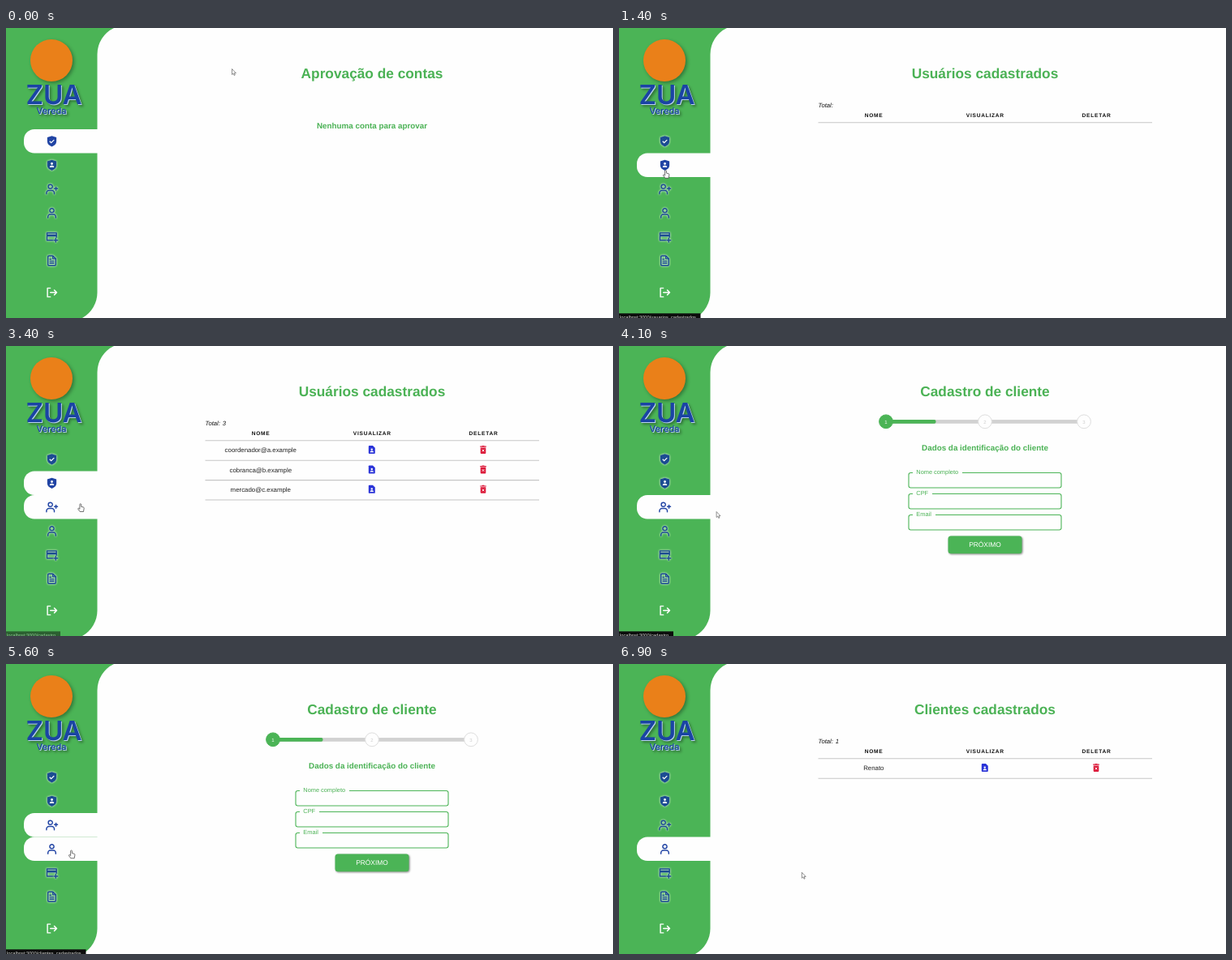
An HTML page that plays this animation: 748 by 358 pixels, repeating every 8 s.

```html
<!DOCTYPE html>
<html lang="pt-BR">
<head>
<meta charset="utf-8">
<title>Painel</title>
<style>
  html, body { margin: 0; width: 100%; height: 100%; overflow: hidden; background: #fefefe; }
  svg { display: block; width: 748px; height: 358px; }
  text { font-family: "Liberation Sans", Arial, sans-serif; text-rendering: geometricPrecision; }
  .brand { font-family: Inter, sans-serif; fill: #1a44a4; text-anchor: middle; filter: drop-shadow(1px 1px 0 #b9d3ee) drop-shadow(2px 2px 1.5px #0005); }
  .title { font-size: 17.3px; }
  .sub { font-size: 9.85px; }
  .title, .sub { font-weight: bold; fill: #4bb255; text-anchor: middle; }
  .head { font-size: 6.6px; font-weight: bold; letter-spacing: .75px; text-anchor: middle; fill: #111; }
  .cell { font-size: 7.87px; text-anchor: middle; fill: #222; }
  .total { font-size: 7.66px; font-style: italic; fill: #111; }
  .label { font-size: 7.4px; fill: #4bb255; }
  .step { font-size: 6px; text-anchor: middle; }
  .line { fill: none; stroke: currentColor; stroke-width: 2.4; stroke-linecap: round; stroke-linejoin: round; }
  .glow { filter: drop-shadow(0 0 2px #ffffffa0) drop-shadow(0 0 2px #ffffff60); }
</style>
</head>
<body>
<svg id="stage" viewBox="0 0 748 358">
  <rect width="748" height="358" fill="#fefefe"/>
  <path d="M0 0H133A36 36 0 0 0 112.5 32.5V326.5A36 36 0 0 1 94 358H0Z" fill="#4bb456"/>
  <circle cx="56" cy="40" r="26" fill="#ea8019" style="filter:drop-shadow(2px 2px 2px #0005)"/>
  <text class="brand" x="59" y="94" font-size="33" font-weight="600">ZUA</text>
  <text class="brand" x="56" y="106" font-size="11" font-weight="500">Vereda</text>
  <g id="menu"></g>
  <g id="pages"></g>
  <g id="status">
    <rect id="bar" y="352.3" height="6" fill="#0c0d0c"/>
    <text id="url" x="1" y="359.2" font-size="5.7" fill="#d4d4d4"></text>
  </g>
  <g id="pointer">
    <path id="arrow" d="M0 0V7L1.6 5.6 2.7 8 3.8 7.5 2.8 5.2H4.9Z" fill="#fff" stroke="#555" stroke-width=".65"/>
    <path id="hand" d="M-.9 .6Q0-.5 .9 .6V3.6L3.6 4.3Q4.5 4.6 4.4 5.6L3.7 9.8H-.7L-3 6.6Q-3.2 5.4-2.1 5.6L-.9 6.6Z" fill="#fff" stroke="#444" stroke-width=".75" stroke-linejoin="round"/>
  </g>
</svg>
<script>
const $ = id => document.getElementById(id);
const GREEN = '#4bb456';
const LOOP = 8000, STEP = 100;
const ROW_TOP = 125, ROW_H = 29.5;

// Menu icons on a 24-unit grid
const shield = '<path fill="currentColor" d="M12 1 2.6 4.2v8.2c0 5.2 4 8.6 9.4 10.8 5.4-2.2 9.4-5.6 9.4-10.8V4.2z"/>';
const person = '<circle cx="12" cy="9" r="2.4" fill="#fff"/><path fill="#fff" d="M7.4 16.4c0-2.4 3-3.4 4.6-3.4s4.6 1 4.6 3.4z"/>';
const line = d => `<path class="line" d="${d}"/>`;
const icons = [
  shield + '<path fill="none" stroke="#fff" stroke-width="2" d="m7.4 12 3.2 3.2 6-6"/>',
  shield + person,
  line('M17 22v-2a5 5 0 0 0-5-5H6a5 5 0 0 0-5 5v2M4.7 7a4.3 4.3 0 0 0 8.6 0 4.3 4.3 0 0 0-8.6 0M20.5 8v6.4M17.3 11.2h6.4'),
  line('M20 22v-2a5 5 0 0 0-5-5H9a5 5 0 0 0-5 5v2M7.7 7a4.3 4.3 0 0 0 8.6 0 4.3 4.3 0 0 0-8.6 0'),
  line('M21.5 13V4H2v15h11.5M20 15v8M16 19h8') + '<path fill="currentColor" d="M2 7h19.5v4.5H2z"/>',
  line('M14 2H6a2 2 0 0 0-2 2v16a2 2 0 0 0 2 2h12a2 2 0 0 0 2-2V8zM14 2v6h6M8 13h8M8 17h8M8 9h2'),
  line('M9 3H3v18h6M9 12h13M17 7l5 5-5 5')
];

const iconY = i => i < 6 ? ROW_TOP + ROW_H * (i + .5) : 326.5;
$('menu').innerHTML = icons.map((icon, i) => {
  const y = ROW_TOP + ROW_H * i;
  const tab = i < 6 ? `<path class="tab" d="M113 ${y}H35a13 13 0 0 0-13 13v${ROW_H - 26}a13 13 0 0 0 13 13h78z" fill="#fefefe"/>` : '';
  return `${tab}<g class="icon${i < 6 ? ' glow' : ''}" transform="translate(49.3 ${iconY(i) - 7.2}) scale(.6)">${icon}</g>`;
}).join('');
const tabs = document.querySelectorAll('.tab');
const glyphs = document.querySelectorAll('.icon');
glyphs[6].style.color = '#fff';

// Pages
const text = (cls, x, y, s, extra = '') => `<text class="${cls}" x="${x}" y="${y}" ${extra}>${s}</text>`;
const rule = y => `<path d="M245.5 ${y}H657" stroke="#c6c6c6" stroke-width="1.1"/>`;
const viewIcon = '<path fill="#2b34d8" d="M-4-4.1Q-4-5-3-5H1.2L4-2.2V4.1Q4 5 3 5H-3Q-4 5-4 4.1Z"/><circle cy="-.4" r="1.2" fill="#fff"/><path fill="#fff" d="M-2.3 3.2Q-2 1.3 0 1.3T2.3 3.2Z"/>';
const binIcon = '<path fill="#dc1a3a" d="M-3.8-4.4H-1.7L-1.2-5H1.2L1.7-4.4H3.8V-3.2H-3.8ZM-3.3-2.6H3.3V4Q3.3 5 2.3 5H-2.3Q-3.3 5-3.3 4Z"/><path d="M-1.3-.2 1.3 2.4M1.3-.2-1.3 2.4" stroke="#fff" stroke-width=".9"/>';

function tablePage(title, names) {
  const rows = names.map((name, i) => {
    const y = 128.3 + 24.4 * i;
    return text('cell', 313.8, y + 2.9, name) +
      `<g transform="translate(450.8 ${y - .3})">${viewIcon}</g><g transform="translate(588 ${y - .3})">${binIcon}</g>` +
      rule(y + 12.9);
  }).join('');
  return text('title', 451, 62.3, title) + text('total', 245.5, 98.4, 'Total:') +
    ['NOME', 'VISUALIZAR', 'DELETAR'].map((h, i) => text('head', 314.1 + 137.2 * i, 110.2, h)).join('') +
    rule(116.8) + `<g class="rows">${text('total', 266.8, 98.4, names.length)}${rows}</g>`;
}

function field(label, y, gapEnd) {
  return `<rect x="357" y="${y}" width="188" height="18.5" rx="2.5" fill="none" stroke="${GREEN}" stroke-width="1.1"/>` +
    `<rect x="362" y="${y - 1}" width="${gapEnd - 362}" height="2" fill="#fefefe"/>` +
    text('label', 366.3, y + 1.8, label);
}

function stepDot(n) {
  const x = 207 + 122 * n, on = n === 1;
  return `<circle cx="${x}" cy="93.3" r="8.4" fill="${on ? GREEN : '#fefefe'}" stroke="${on ? GREEN : '#dedede'}"/>` +
    text('step', x, 95.5, n, `fill="${on ? '#fff' : '#cfcfcf'}"`);
}

const formPage = text('title', 451, 62.3, 'Cadastro de cliente') +
  `<rect x="329" y="91.1" width="244" height="4.6" fill="#d1d1d1"/><rect x="329" y="91.1" width="61.5" height="4.6" rx="2" fill="${GREEN}"/>` +
  [1, 2, 3].map(stepDot).join('') +
  text('sub', 451, 129.4, 'Dados da identificação do cliente') +
  field('Nome completo', 156.5, 423) + field('CPF', 182.5, 386) + field('Email', 208.5, 390) +
  `<rect x="405.5" y="234.5" width="91" height="21.8" rx="3.5" fill="${GREEN}" style="filter:drop-shadow(1px 1.5px 1.2px #0007)"/>` +
  text('', 451, 248.1, 'PRÓXIMO', 'fill="#fff" font-size="8.4" text-anchor="middle"');

const pages = [
  { from: 0, html: text('title', 451, 62.3, 'Aprovação de contas') + text('sub', 451, 124.2, 'Nenhuma conta para aprovar') },
  { from: 1300, rows: 1500, html: tablePage('Usuários cadastrados', ['coordenador@a.example', 'cobranca@b.example', 'mercado@c.example']) },
  { from: 3500, html: formPage },
  { from: 6000, rows: 6200, html: tablePage('Clientes cadastrados', ['Renato']) }
];
$('pages').innerHTML = pages.map(p => `<g>${p.html}</g>`).join('');
const groups = [...$('pages').children];

// Link preview: fade in start/end, fade out start/end, width, address
const links = [
  [1200, 1300, 2000, 2600, 100.5, 'usuarios_cadastrados'],
  [3200, 3600, 4200, 4600, 67, 'cadastro'],
  [5100, 5400, 6300, 6900, 98.5, 'clientes_cadastrados']
];

// Pointer: time, x, y
const path = [
  [400, 278.5, 50.5], [700, 170, 112], [1000, 60, 179], [1200, 57.5, 175.5],
  [1700, 57.5, 175.5], [2000, 270, 178], [2200, 362.8, 191.5], [2600, 340, 200],
  [2800, 280, 204], [3200, 112, 200], [3400, 91.8, 194.7],
  [4000, 91.8, 194.7], [4400, 205, 234], [4700, 246.3, 247.5], [4900, 146, 241],
  [5200, 98, 234], [5600, 80.5, 230],
  [6200, 80.5, 230], [6500, 165, 250], [6800, 225.3, 257.3]
];

const clamp = v => Math.max(0, Math.min(1, v));

function pointerAt(t) {
  const i = path.findIndex(p => p[0] > t);
  if (i === 0) return path[0].slice(1);
  if (i < 0) return path[path.length - 1].slice(1);
  const [a, b] = [path[i - 1], path[i]];
  const k = (t - a[0]) / (b[0] - a[0]);
  return [a[1] + (b[1] - a[1]) * k, a[2] + (b[2] - a[2]) * k];
}

function show(el, on) { el.style.display = on ? '' : 'none'; }

function draw(t) {
  const [x, y] = pointerAt(t);
  const row = Math.floor((y - ROW_TOP) / ROW_H);
  const hover = x > 22 && x < 112 && row >= 0 && row < 6 ? row : -1;
  const page = pages.filter(p => p.from <= t).length - 1;

  tabs.forEach((tab, i) => {
    const on = i === page || i === hover;
    show(tab, on);
    glyphs[i].style.color = on ? '#2144a4' : '#1c4c92';
  });
  groups.forEach((g, i) => {
    show(g, i === page);
    const rows = g.querySelector('.rows');
    if (rows) show(rows, t >= pages[i].rows);
  });

  const link = links.find(l => t >= l[0] && t < l[3]);
  show($('status'), link);
  if (link) {
    const [a, b, c, d, w, name] = link;
    $('status').style.opacity = clamp((t - a) / (b - a)) * clamp((d - t) / (d - c));
    $('bar').setAttribute('width', w);
    $('url').textContent = 'localhost:3000/' + name;
  }

  $('pointer').setAttribute('transform', `translate(${x} ${y})`);
  show($('arrow'), hover < 0);
  show($('hand'), hover >= 0);
}

const start = performance.now();
function tick() {
  const t = (performance.now() - start) % LOOP;
  draw(Math.floor(t / STEP) * STEP);
  requestAnimationFrame(tick);
}
tick();
</script>
</body>
</html>
```
